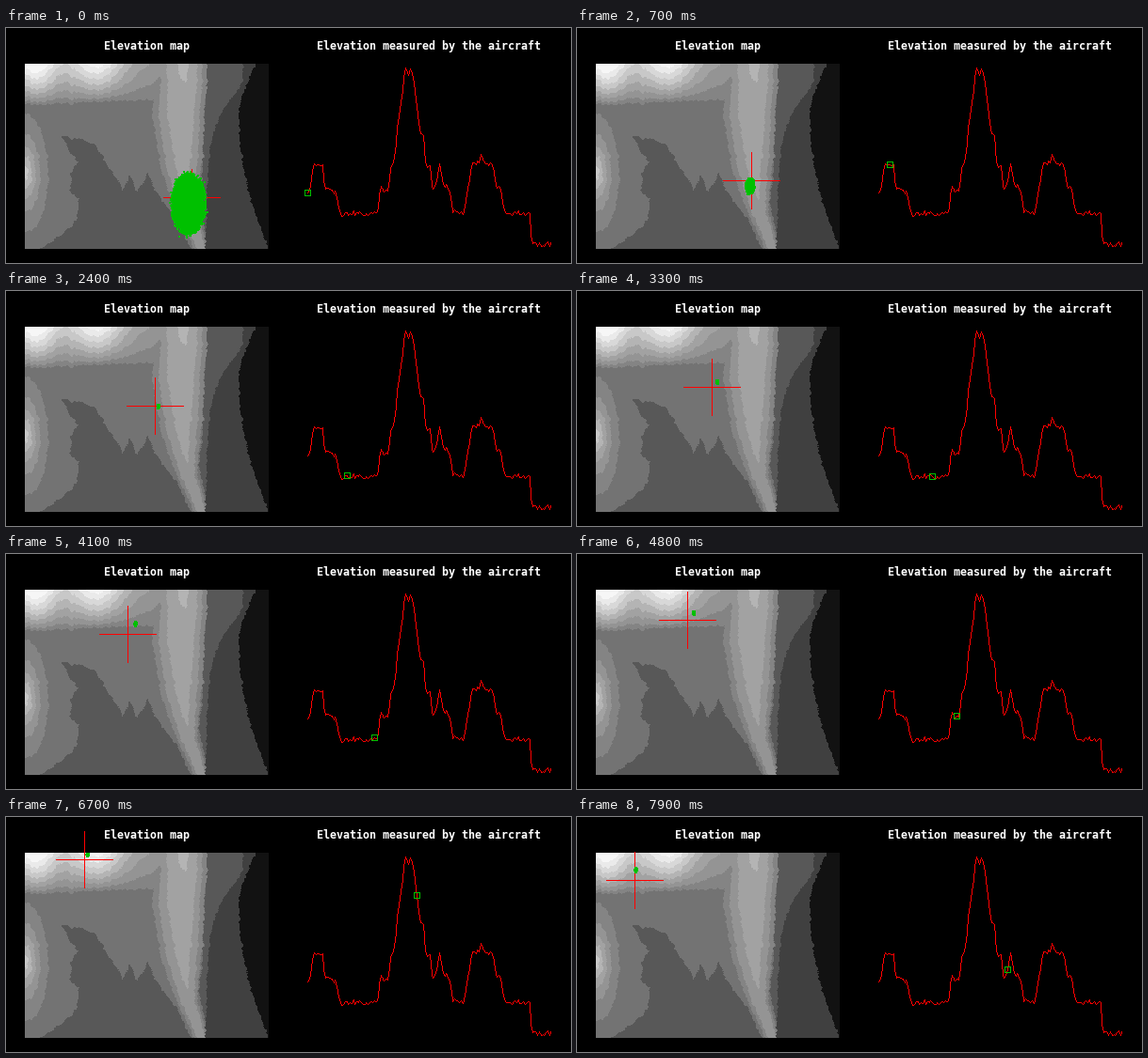
Recreate the animation shown at these times as a matplotlib script. Size 600x250 px, loop 8 s.

```python
import numpy as np
import matplotlib.pyplot as plt
from matplotlib.animation import FuncAnimation

W, H, DPI = 600, 250, 100
FRAMES, STEP = 80, 100
RED, GREEN = (255, 0, 0), (0, 192, 0)
LEFT, TOP, RIGHT, BOTTOM = 20, 38, 278, 234
GREYS = np.array([18, 64, 88, 115, 132, 148, 162, 180, 200, 216, 234, 246])
rng = np.random.default_rng(7)


def keyed(t, *keys):
    """Piecewise linear value through (t, value) keys."""
    return np.interp(t, *np.array(keys, float).T)


def elevation(x, y):
    """Height of the terrain, in grey steps."""
    # peaks along the upper edge
    peaks = (6 * np.exp(-((x - 30) / 25) ** 2)
             + 5.5 * np.exp(-((x - 95) / 30) ** 2)
             + 2 * np.clip((200 - x) / 50, 0, 1))
    depth = 81 - 0.04 * (x - LEFT) - y
    north = 4 + peaks * np.clip(depth / 40, 0, None) ** 0.8
    north = np.where(depth > 0, north, 3)

    # ridge running down and fading out
    axis = keyed(y, (38, 188), (150, 188), (195, 194), (234, 208))
    west = keyed(y, (38, 30), (95, 33), (150, 24), (195, 14), (234, 8))
    east = keyed(y, (38, 24), (140, 20), (195, 8), (234, 6))
    u = np.abs(x - axis) / np.where(x < axis, west, east)
    crest = keyed(y, (38, 3.15), (57, 3), (181, 2), (234, 1.6))
    ridge = np.where(u < 1, 4 + crest * (1 - u ** 2), 3)

    # hill cut by the left edge
    u = np.hypot((x - LEFT) / 24, (y - 154) / 63)
    hill = np.where(u < 1, 4 + 4.8 * np.clip(1 - u, 0, 1) ** 1.5, 3)

    h = np.maximum.reduce([north, ridge, hill])

    # valley
    rim = keyed(x, (59, 114), (80, 118), (96, 125), (104, 141), (124, 172),
                (130, 155), (139, 174), (150, 154), (158, 173), (183, 207),
                (196, 234))
    bank = keyed(y, (115, 59), (135, 70), (142, 76), (152, 68), (172, 68),
                 (183, 77), (203, 74), (220, 58), (234, 36))
    h[(h < 4) & (y > rim) & (x > bank)] = 2

    # descent towards the right
    shelf = keyed(y, (38, 213), (150, 208), (188, 204), (234, 215))
    slope = 211 + 40 / (1 + np.clip((y - 38) / 48, 0, None) ** 3)
    t = y - 95
    shore = 247 + np.where(t < 0, 18 * (t / 57) ** 2, 31 * (t / 137) ** 2)
    h[(x > shelf) & (h < 4.3)] = 2
    h[x > slope] = 1
    h[x > shore] = 0
    return h


def ragged(n):
    return np.convolve(rng.normal(0, 1.3, n + 2), np.ones(3) / 3, "valid")


def dot(img, x, y, color):
    img[np.clip(y, 0, H - 1), np.clip(x, 0, W - 1)] = color


def trace(img, xs, ys, color):
    """One-pixel polyline."""
    for x0, y0, x1, y1 in zip(xs, ys, xs[1:], ys[1:]):
        n = max(abs(x1 - x0), abs(y1 - y0)) + 1
        dot(img, np.rint(np.linspace(x0, x1, n)).astype(int),
            np.rint(np.linspace(y0, y1, n)).astype(int), color)


# Static picture
base = np.zeros((H, W, 3), np.uint8)
gy, gx = np.mgrid[TOP:BOTTOM + 1, LEFT:RIGHT + 1].astype(float)
rows, cols = gx.shape
level = elevation(gx + ragged(rows)[:, None], gy + ragged(cols))
level = np.clip(level, 0, len(GREYS) - 1).astype(int)
base[TOP:BOTTOM + 1, LEFT:RIGHT + 1] = GREYS[level][..., None]

# Measured profile: terraces joined by steep steps, with sensor noise
track = 320 + np.arange(150) * 260 / 150
heights = keyed(
    track, (320, 173), (323, 172), (326, 144), (336, 145), (338, 171),
    (350, 173), (354, 197), (394, 197), (397, 170), (405, 173), (409, 143),
    (411, 146), (415, 109), (424, 39), (427, 53), (430, 42), (435, 72),
    (439, 112), (443, 113), (445, 145), (450, 146), (452, 170), (456, 168),
    (460, 141), (464, 167), (470, 170), (474, 196), (486, 198), (490, 169),
    (495, 143), (502, 143), (504, 133), (508, 143), (516, 145), (521, 170),
    (525, 171), (529, 196), (556, 197), (558, 229), (579, 230))
steep = np.abs(np.gradient(heights)) > 3
noise = rng.uniform(-3, 3, 150) * ~steep
px = np.rint(track).astype(int)
py = np.rint(heights + noise).astype(int)
trace(base, px, py, RED)

# Particle cloud in unit scale
N = 4000
angle = rng.uniform(0, 2 * np.pi, N)
radius = np.sqrt(rng.uniform(0, 1, N)) * 0.92 + rng.normal(0, 0.065, N)
spread = np.c_[19 * radius * np.cos(angle), 34 * radius * np.sin(angle)]


def plane(n):
    """Position of the aircraft; it bounces off the upper edge."""
    x = keyed(n, (0, 197), (18, 167), (27, 153), (45, 122), (56, 103), (79, 61))
    y = keyed(n, (0, 180), (9, 157), (18, 137), (27, 115), (36, 95), (54, 58),
              (64, 39), (79, 67))
    return int(np.rint(x)), int(np.rint(y))


def render(n):
    img = base.copy()
    x, y = plane(n)
    trace(img, [x - 30, x + 30], [y, y], RED)
    trace(img, [x, x], [y - 30, y + 30], RED)

    cx = x + keyed(n, (0, -3.5), (41, 8), (79, 1))
    cy = y + keyed(n, (0, 6.5), (18, 4), (41, -11), (60, -2), (79, -11))
    size = max(np.exp(-n / 5), 0.06)
    p = np.rint(spread * size + (cx - 0.5, cy - 0.5)).astype(int)
    p = p[((p >= (LEFT, TOP)) & (p < (RIGHT, BOTTOM))).all(axis=1)]
    for dx in (0, 1):
        for dy in (0, 1):
            dot(img, p[:, 0] + dx, p[:, 1] + dy, GREEN)

    l, r, t, b = px[n] - 3, px[n] + 3, py[n] - 3, py[n] + 3
    trace(img, [l, r, r, l, l], [t, t, b, b, t], GREEN)
    return img


fig = plt.figure(figsize=(W / DPI, H / DPI), dpi=DPI, facecolor="black")
ax = fig.add_axes([0, 0, 1, 1])
ax.axis("off")
view = ax.imshow(render(0), interpolation="nearest", aspect="auto")
for x, label in ((103, "Elevation map"),
                 (329, "Elevation measured by the aircraft")):
    ax.text(x, 22.5, label, color="white", family="DejaVu Sans Mono",
            weight="bold", size=11.63 * 72 / DPI, va="baseline")


def update(n):
    view.set_data(render(n))
    return view,


anim = FuncAnimation(fig, update, frames=FRAMES, interval=STEP,
                     repeat=True, repeat_delay=0, blit=False)
plt.show()
```
